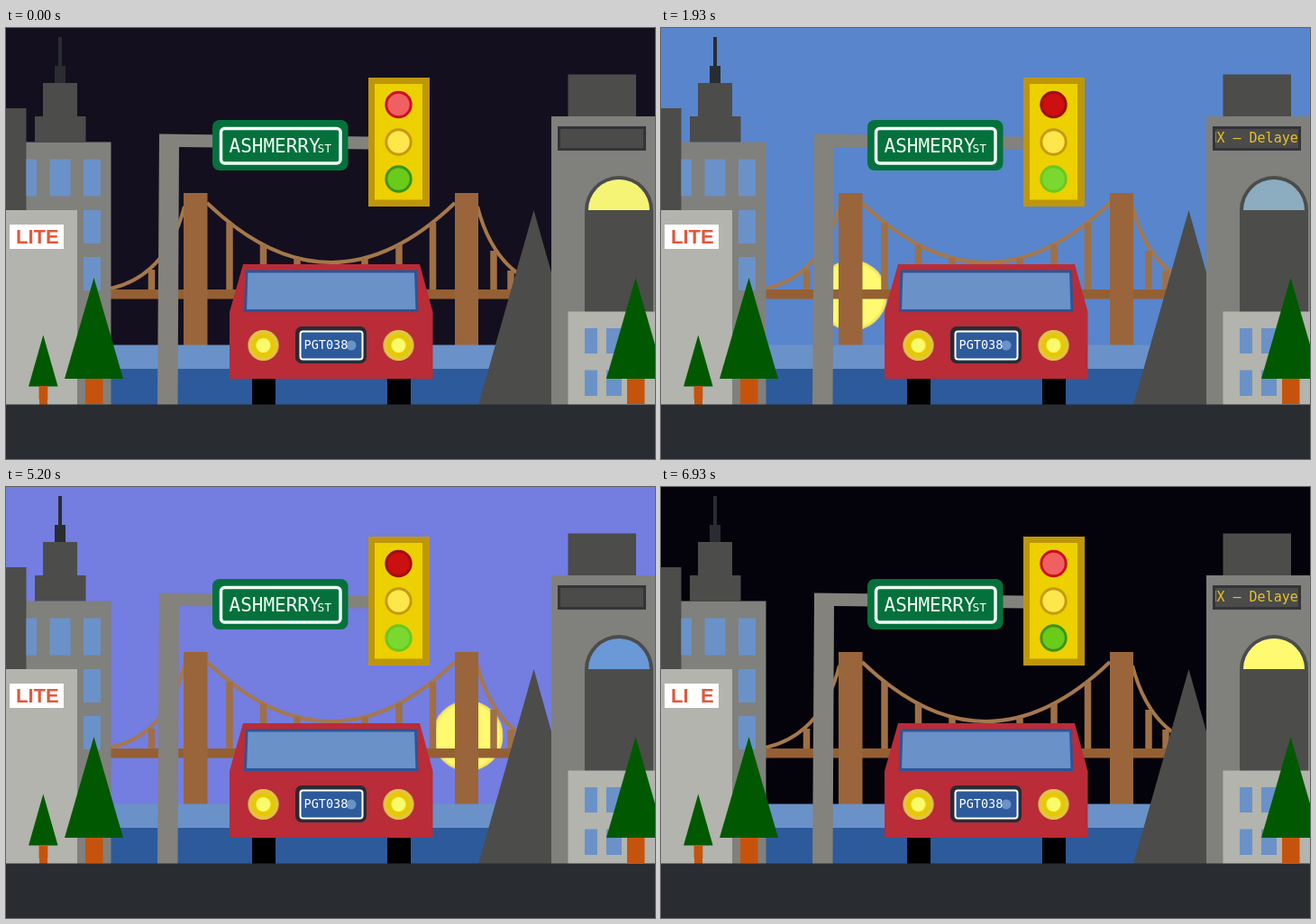
Write an HTML page that moves like this. It is 720x478 px and loops after 6.99 s.

```html
<!DOCTYPE html>
<html lang="en">
<head>
<meta charset="utf-8">
<title>City day and night</title>
<style>
  html, body { margin: 0; width: 100%; height: 100%; overflow: hidden; background: #000; }
  svg { display: block; width: 720px; height: 478px; }

  .mono { font-family: "DejaVu Sans Mono", monospace; }
  .lite { font: bold 22px "Liberation Sans", Arial, sans-serif; fill: #e0583c; }
  .stone { fill: #80807d; }
  .dark { fill: #4c4c4a; }
  .pale { fill: #b2b4ad; }
  .glass { fill: #6a92c8; }
  .ink { fill: #292d31; }

  .sky, .sun, .lamp, .glow, .ticker, .letter, .stop, .go {
    animation: 6300ms linear -5815ms infinite paused;
  }
  .sky { animation-name: sky; }
  .sun { animation-name: orbit; transform-origin: 361.4px 277.5px; }
  .lamp { animation-name: lamp; }
  .glow { animation-name: glow; }
  .ticker { animation-name: ticker; animation-duration: 5000ms; animation-delay: 0ms; }
  .letter, .stop, .go {
    animation-duration: 3000ms; animation-delay: 0ms; animation-timing-function: step-end;
  }
  .letter { animation-name: letter; }
  .stop { animation-name: stop; }
  .go { animation-name: go; }

  @keyframes sky {
    0%, 2% { fill: #030008; }
    28.5%, 60% { fill: #6ea8ff; }
    75% { fill: #747de0; }
    85% { fill: #241d32; }
    100% { fill: #030008; }
  }
  @keyframes orbit { to { transform: rotate(360deg); } }
  @keyframes lamp {
    0%, 3% { opacity: 1; }
    35%, 73% { opacity: 0; }
    90% { opacity: .95; }
    100% { opacity: 1; }
  }
  @keyframes glow {
    0%, 3% { opacity: 1; }
    28.5%, 75% { opacity: 0; }
    89% { opacity: .92; }
    100% { opacity: 1; }
  }
  @keyframes ticker {
    from { transform: translateX(728px); }
    to { transform: translateX(346px); }
  }
  @keyframes letter {
    0% { opacity: 1; }
    2% { opacity: 0; }
    33%, 100% { opacity: 1; }
  }
  @keyframes stop {
    0% { fill: #f06062; stroke: #cc101a; }
    36% { fill: #cc0f10; stroke: #a00e0e; }
    80%, 100% { fill: #f06062; stroke: #cc101a; }
  }
  @keyframes go {
    0% { fill: #6bcb1a; stroke: #3d9413; }
    36% { fill: #7ad830; stroke: #6bc81c; }
    80%, 100% { fill: #6bcb1a; stroke: #3d9413; }
  }
</style>
</head>
<body>
<svg viewBox="0 0 720 478">
  <defs>
    <clipPath id="board"><rect x="615" y="111" width="92" height="23"/></clipPath>
    <g id="tree">
      <path d="M-9.5 111H10V140H-9.5Z" fill="#c6530b"/>
      <path d="M0 0L32.5 112H-32.5Z" fill="#005900"/>
    </g>
    <g id="headlight">
      <circle r="17" fill="#83827d"/>
      <circle r="13" fill="#4b4b49"/>
      <circle r="8" fill="#83827d"/>
      <g class="lamp">
        <circle r="17" fill="#eac63c"/>
        <circle r="13" fill="#edcf00"/>
        <circle r="8" fill="#ffff6c"/>
      </g>
    </g>
  </defs>

  <rect class="sky" width="720" height="478"/>
  <g class="sun">
    <circle cx="361.4" cy="428.3" r="37.5" fill="#fffa70" stroke="#fbe560" stroke-width="3"/>
  </g>

  <!-- bridge -->
  <g fill="none" stroke="#a5784c" stroke-width="4">
    <path d="M116 289Q178 275 198 198M223 194Q360.5 326 498 194M523 198Q543 275 605 289"/>
    <path stroke="#9f7045" stroke-width="7.5" d="M161.5 268V292M248 216V292M285.5 240V292M323 255V292M398 255V292M436 240V292M473.5 216V292M541 247V292M560 269V292"/>
  </g>
  <path d="M116 290H605V300.500H116Z" fill="#946033"/>
  <path d="M197 183H223.500V352H197ZM498 183H524V352H498Z" fill="#9a653a"/>

  <!-- river -->
  <path class="glass" d="M100 351.500H620V379H100Z"/>
  <path d="M100 378H620V418H100Z" fill="#2d5a9b"/>

  <!-- left buildings -->
  <path class="stone" d="M22 126.500H116.500V418H22Z"/>
  <path class="dark" d="M0 89H22.500V203H0ZM32 126.500V98H41V61H79V98H88.500V126.500Z"/>
  <path class="ink" d="M54 61V42H58V10H62V42H66V61Z"/>
  <path class="glass" d="M22.500 145.500H34V186.500H22.500ZM48.500 145.500H71.500V186.500H48.500ZM86 145.500H105V186.500H86ZM86 202H105V239H86ZM86 254H105V291H86Z"/>
  <path class="pale" d="M0 202H79V418H0Z"/>
  <rect x="4" y="218" width="60" height="27" fill="#fff"/>
  <text class="lite" x="11" y="239">LI<tspan visibility="hidden">T</tspan>E</text>
  <text class="lite letter" x="30.600" y="239">T</text>

  <!-- right buildings -->
  <path class="dark" d="M585.500 202L646.500 418H524ZM623.500 51.500H699V99H623.500Z"/>
  <path class="stone" d="M605 98H720V418H605Z"/>
  <rect x="613.500" y="110.500" width="95" height="24" fill="#4b4b49" stroke="#343338" stroke-width="3"/>
  <g clip-path="url(#board)">
    <text class="mono ticker" y="126.500" font-size="15" fill="#e9c22e">BRONX – Delayed by 15 min</text>
  </g>
  <path class="dark" d="M642 202A38 38 0 0 1 718 202V316H642Z"/>
  <path d="M646 202A34 34 0 0 1 714 202Z" fill="#6b98d6"/>
  <path class="glow" d="M646 202A34 34 0 0 1 714 202Z" fill="#fffa70"/>
  <path class="pale" d="M623.500 314.500H720V418H623.500Z"/>
  <path class="glass" d="M642 333H656V361H642ZM666 333H683V361H666ZM642 379.500H656V408H642ZM666 379.500H683V408H666Z"/>

  <use href="#tree" x="97.500" y="277"/>
  <use href="#tree" x="698.500" y="277"/>
  <use href="#tree" transform="translate(41.300 340.500) scale(.5 .508)"/>
  <path d="M37 397H46V418H37Z" fill="#c6530b"/>

  <!-- street sign and traffic light -->
  <path d="M170 117.500L402 120.500V134.500L192 132L190.500 418H168Z" fill="#83827d"/>
  <rect x="229" y="102" width="150.500" height="56" rx="8" fill="#04713c"/>
  <rect x="238.500" y="111.500" width="132.500" height="38.500" rx="4" fill="none" stroke="#f2fff6" stroke-width="3.500"/>
  <g class="mono" fill="#f2fff6">
    <text x="247.500" y="138" font-size="21">ASHMERRY</text>
    <text x="345.500" y="138" font-size="13">ST</text>
  </g>
  <rect x="402" y="55" width="68" height="143" fill="#bd960a"/>
  <rect x="409" y="62" width="53" height="128.500" fill="#ecd000"/>
  <g stroke-width="3">
    <circle class="stop" cx="435.500" cy="85" r="13.700"/>
    <circle cx="435.500" cy="126.500" r="13.700" fill="#fde74a" stroke="#c59a10"/>
    <circle class="go" cx="435.500" cy="167.500" r="13.700"/>
  </g>

  <!-- car -->
  <path d="M273 388H299V418H273ZM423 388H449V418H423Z"/>
  <path d="M263 262H459L473.500 315V389H248V315Z" fill="#b92c38"/>
  <path class="glass" d="M267 270H454.500L456 313.500H265.500Z" stroke="#2d5596" stroke-width="3"/>
  <use href="#headlight" x="285.500" y="352"/>
  <use href="#headlight" x="435.500" y="352"/>
  <rect x="321" y="331" width="79" height="41" rx="7" fill="#272c36"/>
  <rect x="326.500" y="336.500" width="69" height="31" rx="3" fill="#2d5a9b" stroke="#fff" stroke-width="2"/>
  <circle class="glass" cx="383" cy="352" r="5.500"/>
  <text class="mono" x="330.500" y="356" font-size="13.500" fill="#fff">PGT038</text>

  <path class="ink" d="M0 417.500H720V478H0Z"/>
</svg>
<script>
  const LOOP = 6990, STEP = 1000 / 15;
  const parts = document.getAnimations();
  const start = performance.now();

  function draw() {
    const t = (performance.now() - start) % LOOP;
    const time = Math.floor((t + 5) / STEP) * STEP;
    for (const part of parts) part.currentTime = time;
    requestAnimationFrame(draw);
  }
  draw();
</script>
</body>
</html>
```
